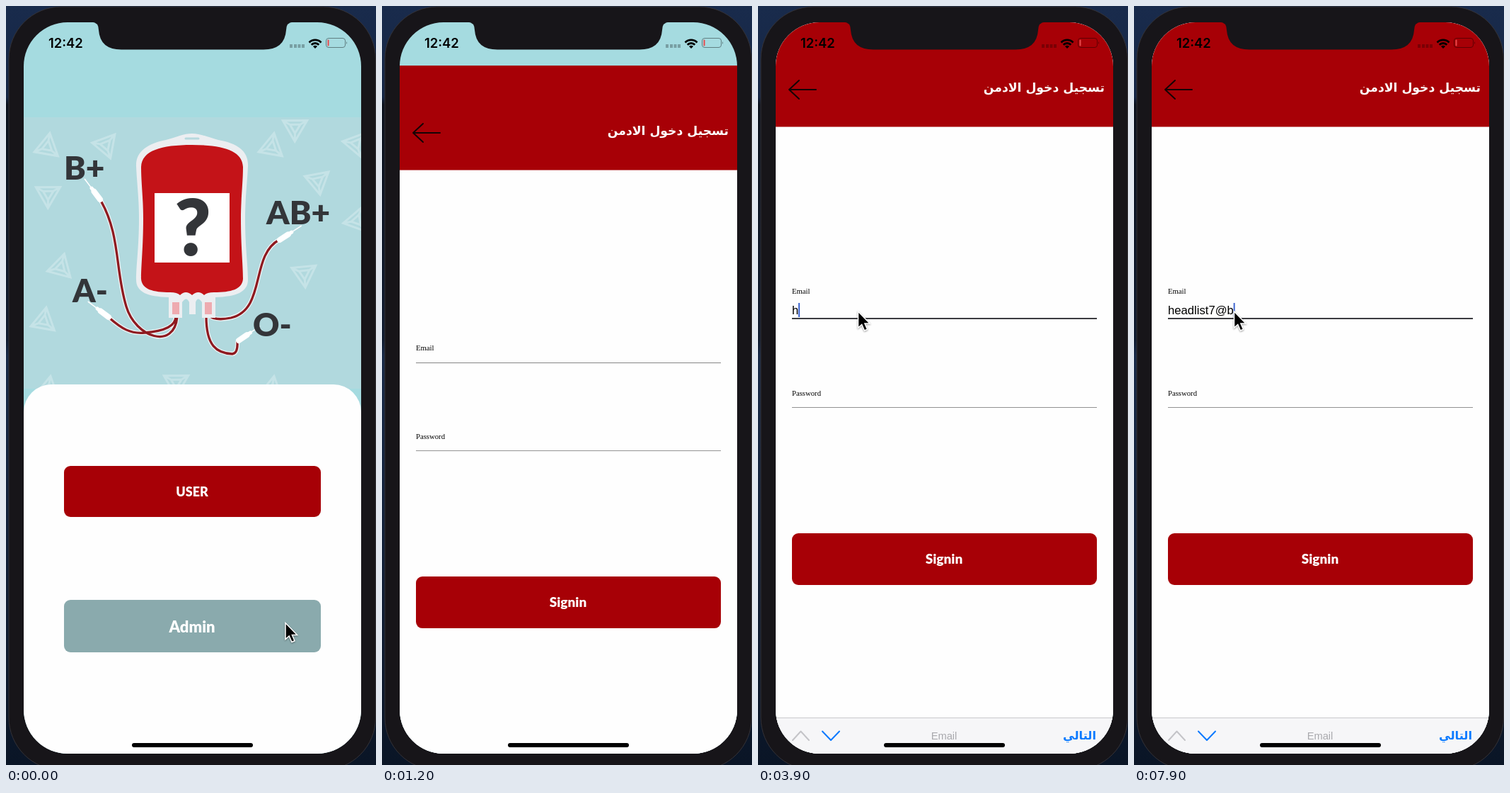
Write an HTML page that moves like this. It is 523x1071 px and loops after 8000 ms.

```html
<!DOCTYPE html>
<html lang="en">
<head>
<meta charset="utf-8">
<title>Blood donation app: admin sign-in</title>
<style>
  html, body { margin: 0; width: 100%; height: 100%; overflow: hidden; background: #12213b; }
  svg { display: block; width: 100%; height: 100%; }
  .lato { font-family: Lato, sans-serif; font-weight: 900; }
  .serif { font: 10.7px "Liberation Serif", serif; }
  .sans { font-family: "Liberation Sans", sans-serif; }
  .arabic { font-family: "DejaVu Sans", sans-serif; font-weight: 700; }
  .mid { text-anchor: middle; }
  .line { fill: none; stroke-width: 2; stroke-linecap: round; stroke-linejoin: round; }
</style>
</head>
<body>
<svg viewBox="0 0 523 1071" preserveAspectRatio="none">
  <defs>
    <linearGradient id="desk" x2="0" y2="1">
      <stop offset="0" stop-color="#192b4c"/><stop offset=".12" stop-color="#152645"/>
      <stop offset=".13" stop-color="#0c121d"/><stop offset=".44" stop-color="#101c30"/>
      <stop offset=".46" stop-color="#182a48"/><stop offset="1" stop-color="#0a1526"/>
    </linearGradient>
    <clipPath id="screen"><rect x="25" y="23" width="477" height="1032" rx="62"/></clipPath>
    <clipPath id="poster"><rect x="25" y="157" width="477" height="383"/></clipPath>
    <path id="tri" d="M0-17L17 13H-17ZM0-6L7 7H-7ZM0-17V-6M17 13L7 7M-17 13L-7 7" fill="none" stroke="#fff" stroke-width="3"/>
    <g id="needle" stroke="#fff" stroke-linecap="round">
      <path d="M0 0H14" stroke-width="8"/><path d="M14 0H20" stroke-width="5"/><path d="M18 0H36" stroke-width="1.6"/>
    </g>
    <path id="tubes" fill="none" d="M133 273C162 322 154 372 170 424C183 468 238 486 242 438
      M146 440C163 455 176 463 196 461C222 459 240 453 240 438
      M386 330C345 352 368 428 318 440C304 443 292 442 286 436
      M283 438C283 480 298 490 320 491Q328 490 327 473"/>
  </defs>

  <rect width="523" height="1071" fill="url(#desk)"/>
  <rect x="4" y="1" width="518.5" height="1077" rx="74" fill="#171519" stroke="#343237"/>

  <g clip-path="url(#screen)">
    <rect x="25" y="23" width="477" height="1032" fill="#a5dbe0"/>
    <g clip-path="url(#poster)">
      <rect x="25" y="157" width="477" height="383" fill="#b1d9de"/>
      <g id="pattern" opacity=".27"></g>
    </g>
    <use href="#tubes" stroke="#eef3f4" stroke-width="6"/>
    <use href="#tubes" stroke="#8e1a20" stroke-width="3.3"/>
    <use href="#needle" transform="translate(133 273) rotate(-127)"/>
    <use href="#needle" transform="translate(145 439) rotate(-143)"/>
    <use href="#needle" transform="translate(387 330) rotate(-33)"/>
    <use href="#needle" transform="translate(329 472) rotate(-34)"/>

    <path fill="#eceef1" d="M263 180C275 180 285 185 300 189C328 194 343 205 342 226C341 250 338 270 338 300C338 340 342 365 342 386
      C342 404 325 410 296 411V440H277V418Q271 409 268 418V435H259V418Q255 409 249 418V440H230V411
      C200 410 184 404 184 386C184 365 188 340 188 300C188 270 185 250 184 226C183 205 201 194 226 189C241 185 251 180 263 180Z"/>
    <path fill="#c41318" d="M263 196C307 196 334 204 335 227C335 250 332 270 332 300C332 340 335 365 335 385C334 400 318 404 294 404
      Q284 404 280 408Q272 400 263 408Q254 400 246 408Q242 404 232 404C208 404 192 400 191 385C191 365 194 340 194 300
      C194 270 191 250 191 227C192 204 219 196 263 196Z"/>
    <path d="M254 187H272" stroke="#b6d9de" stroke-width="3" stroke-linecap="round"/>
    <path d="M235 418h10v17h-10ZM281 418h10v17h-10Z" fill="#eeabb0"/>
    <path d="M210 264H316V362H210Z" fill="#fff"/>
    <g class="lato" fill="#333539">
      <text x="264" y="352" class="mid" font-size="110">?</text>
      <g font-size="46">
        <text x="82" y="245">B+</text><text x="368" y="308">AB+</text>
        <text x="94" y="418">A-</text><text x="349" y="466">O-</text>
      </g>
    </g>

    <path d="M25 1060V573A39 39 0 0 1 64 534H463A39 39 0 0 1 502 573V1060Z" fill="#fefefe"/>
    <rect x="82" y="649" width="363" height="72" rx="9" fill="#a70006"/>
    <rect x="82" y="838" width="363" height="74" rx="9" fill="#8aaaad"/>
    <g class="lato mid" fill="#fff">
      <text x="263" y="692" font-size="18">USER</text>
      <text id="admin" x="263" y="884" font-size="22">Admin</text>
    </g>

    <g id="login">
      <rect x="25" y="23" width="477" height="1040" fill="#fefefe"/>
      <rect x="25" y="23" width="477" height="147.5" fill="#a70006"/>
      <path class="line" stroke="#150405" d="M82 118H44L58 105M44 118L58 131"/>
      <text class="arabic" x="490" y="121" font-size="17.2" text-anchor="end" fill="#fff">تسجيل دخول الادمن</text>
      <text id="label" class="serif" x="48" y="425">Email</text>
      <text class="serif" x="48" y="550">Password</text>
      <path id="rule" d="M48 442H479"/>
      <path d="M48 566.5H479" stroke="#929292"/>
      <text id="typed" class="sans" x="48" y="435" font-size="16.67"></text>
      <rect id="caret" y="419" width="2" height="20" fill="#3e66cf"/>
      <rect x="48" y="744" width="431" height="73" rx="9" fill="#a70006"/>
      <text class="lato mid" x="263" y="787" font-size="19" fill="#fff">Signin</text>
    </g>

    <g id="bar">
      <rect x="25" y="1004" width="477" height="60" fill="#f6f6f8"/>
      <path d="M25 1004.5H502" stroke="#c9c9cc"/>
      <path class="line" stroke="#c4c4c8" d="M49 1036L60.500 1023.500L72 1036"/>
      <path class="line" stroke="#0a7aff" d="M91 1023.500L103 1036L115 1023.500"/>
      <text class="sans mid" x="263" y="1035" font-size="14.7" fill="#a9a9ad">Email</text>
      <text class="arabic" x="478" y="1035" font-size="16.3" text-anchor="end" fill="#0a7aff">التالي</text>
    </g>
    <rect id="home" x="178" y="1040" width="171" height="6" rx="3"/>

    <text x="60" y="59" style="font:600 18.4px Inter,sans-serif">12:42</text>
    <path d="M401 54h4v5h-4zM407 54h4v5h-4zM412.500 54h4v5h-4zM418 54h4v5h-4z" opacity=".27"/>
    <path d="M428.500 51.500A12 12 0 0 1 445.500 51.500M431.700 54.700A7.500 7.500 0 0 1 442.300 54.700" fill="none" stroke="#000" stroke-width="2.8"/>
    <path d="M437 60L434 57A4.200 4.200 0 0 1 440 57Z"/>
    <g opacity=".42"><rect x="452.500" y="45.500" width="27" height="13" rx="3.500" fill="none" stroke="#000"/><path d="M481 50q2 2 0 4z"/></g>
    <rect x="454.500" y="47.500" width="2" height="9" rx="1" fill="#e9494b"/>
  </g>
  <path d="M121 22.500Q131 23 131 34Q133 61.500 163 61.500H364Q394 61.500 396 34Q396 23 406 22.500Z" fill="#171519"/>

  <path id="pointer" d="M0 0V23L5.200 18.500L9 27L13 25.300L9.400 17H16.500Z" stroke="#fff" stroke-width="1.500" style="filter:drop-shadow(0 1px 1px #0006)"/>
</svg>
<script>
const $ = id => document.getElementById(id);
const set = (id, attrs) => { for (const k in attrs) $(id).setAttribute(k, attrs[k]); };
const LOOP = 8000, STEP = 100;
const FOCUS = 3000, PUSH = 968.4;

// Keystrokes, with one typo that is deleted again
const keys = [
  [FOCUS, ''], [3900, 'h'], [4000, 'he'], [4200, 'hea'], [4400, 'head'], [4600, 'headl'],
  [4700, 'headlt'], [5300, 'headlta'], [5600, 'headlt'], [5900, 'headl'], [6000, 'headli'],
  [6100, 'headlis'], [6400, 'headlist'], [6900, 'headlist7'], [7600, 'headlist7@'], [7800, 'headlist7@b']
];

const triangles = [
  [59, 196, 10], [143, 194, 40], [62, 264, 60], [78, 366, 15], [54, 442, 10], [376, 196, 10], [411, 170, 60],
  [443, 245, 50], [424, 376, 55], [497, 192, 40], [497, 300, 20], [243, 530, 60], [376, 539, 10], [60, 539, 10]
];
$('pattern').innerHTML = triangles.map(([x, y, a]) =>
  `<use href="#tri" transform="translate(${x} ${y}) rotate(${a})"/>`).join('');

const progress = (t, from, to) => Math.min(1, Math.max(0, (t - from) / (to - from)));
const smooth = p => p * p * (3 - 2 * p);
const mix = (a, b, p) => a + (b - a) * p;

// Critically damped spring: 1 at the start, 0 when settled
const spring = t => { const s = Math.max(0, t) * .0196; return (1 + s) * Math.exp(-s); };

function pointer(t) {
  if (t < 1200) {
    const p = smooth(progress(t, 800, 1000));
    return [mix(395, 385.5, p), mix(870.5, 856, p)];
  }
  const p = smooth(progress(t, 2300, 2800));
  return [mix(330, 141.5, p), mix(600, 431, p)];
}

function draw(t) {
  const slide = 1032 * spring(t - PUSH);
  set('login', { transform: `translate(0 ${slide < .5 ? 0 : slide})` });
  set('admin', { opacity: mix(1, .34, progress(t, 800, 950)) });
  set('home', { fill: slide > 870 && slide < 1020 ? '#463e42' : '#000' });

  const focused = t >= FOCUS;
  set('label', { y: mix(425, 406, smooth(progress(t, FOCUS, FOCUS + 200))) });
  set('rule', { stroke: focused ? '#3c3c40' : '#858585', 'stroke-width': focused ? 2 : 1,
    transform: `translate(0 ${focused ? -1 : .5})` });
  set('bar', { transform: `translate(0 ${52 * spring(t - FOCUS)})` });

  const [since, text] = keys.findLast(k => k[0] <= t) || [0, ''];
  $('typed').textContent = text;
  const idle = (t - since) % 1000;
  const width = text ? $('typed').getComputedTextLength() : 0;
  set('caret', { x: 47.8 + width, opacity: focused && !(idle >= 400 && idle < 800) ? 1 : 0 });

  set('pointer', { transform: `translate(${pointer(t)})`, opacity: t < 1200 || t >= 2300 ? 1 : 0 });
}

function tick() {
  const t = performance.now() % LOOP;
  draw(Math.floor(t / STEP) * STEP);
  requestAnimationFrame(tick);
}
tick();
</script>
</body>
</html>
```
